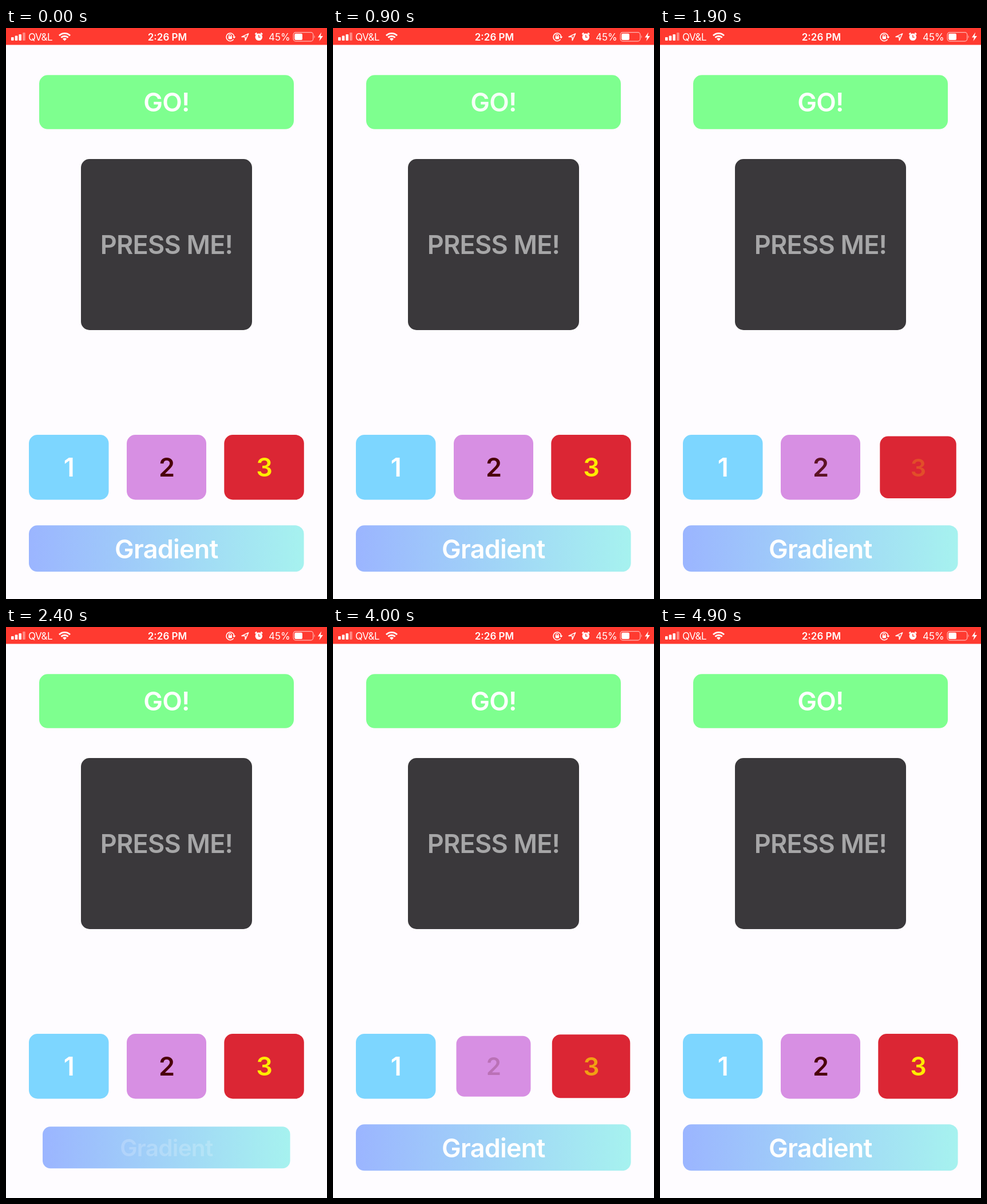
An HTML page that plays this animation: 561x998 px, repeating every 5 s.

```html
<!DOCTYPE html>
<html lang="en">
<head>
<meta charset="utf-8">
<title>Buttons</title>
<style>
  html, body { margin: 0; width: 100%; height: 100%; overflow: hidden; background: #fefcff; }
  svg { display: block; width: 100%; height: 100%; }
  text { font-family: Inter, Roboto, sans-serif; font-optical-sizing: none; }
  #buttons text { font-size: 45px; font-weight: 600; letter-spacing: -.018em; text-anchor: middle; }
  #status text { font-size: 17px; }
</style>
</head>
<body>
<svg viewBox="0 0 561 998">
  <defs>
    <linearGradient id="fade">
      <stop stop-color="#9bb5ff"/>
      <stop offset="1" stop-color="#a6f2ef"/>
    </linearGradient>
  </defs>
  <rect width="561" height="998" fill="#fefcff"/>
  <g id="status" fill="#fff">
    <rect width="561" height="29.5" fill="#ff3a30"/>
    <rect x="9" y="16" width="4.6" height="6" rx="1"/>
    <rect x="15.7" y="13.5" width="4.6" height="8.5" rx="1"/>
    <rect x="22.4" y="11" width="4.6" height="11" rx="1"/>
    <rect x="29.1" y="8" width="4.6" height="14" rx="1" opacity=".4"/>
    <text x="39" y="22" letter-spacing="-.4">QV&amp;L</text>
    <path d="M93 13.2a13.6 13.6 0 0 1 19 0M96.4 16.7a8.8 8.8 0 0 1 12.2 0" fill="none" stroke="#fff" stroke-width="2.9"/>
    <path d="M102.5 22.6l-3.5-3.6a5 5 0 0 1 7 0z"/>
    <text x="282" y="22" font-weight="600" text-anchor="middle">2:26 PM</text>
    <g fill="none" stroke="#fff" stroke-width="1.5">
      <path d="M397.6 19.6a6.8 6.8 0 1 1 1.1-4.2"/>
      <path d="M389.7 15v-1.6a2.1 2.1 0 0 1 4.2 0V15" stroke-width="1.3"/>
      <path d="M412 15.5l11.7-5.6-5.4 11.7-.3-6z" stroke-linejoin="round"/>
      <rect x="502.2" y="7.7" width="34.6" height="15.4" rx="4" stroke-width="1.2" opacity=".65"/>
      <path d="M435.5 11.2l2.8-2.5M448.1 11.2l-2.8-2.5" stroke-width="2.4"/>
    </g>
    <rect x="388.7" y="14.6" width="6.2" height="4.8" rx=".7"/>
    <path d="M396 15h5.4l-2.7 3.5z"/>
    <circle cx="441.8" cy="15.8" r="6.3"/>
    <path d="M441.8 12v4.2h3" fill="none" stroke="#ff3a30" stroke-width="1.3"/>
    <text x="459" y="22">45%</text>
    <rect x="504.3" y="9.8" width="13.7" height="11.2" rx="2"/>
    <path d="M538.6 12.5q2.2 2.8 0 5.8z" opacity=".65"/>
    <path d="M551.3 7.5l-6.3 8.9h4l-1.6 6.6 6.6-9h-4.3z"/>
  </g>
  <g id="buttons"></g>
</svg>
<script>
  // label, x, y, width, height, fill, text colour, presses as [down, up] in ms
  const buttons = [
    ["GO!", 58, 82.3, 445, 94.5, "#7eff8f", "#fff", [[510, 657]]],
    ["PRESS ME!", 131, 229, 299, 299, "#3a383b", "#a6a6a7", [[905, 1050]]],
    ["1", 40, 711, 139.5, 113.5, "#7dd6ff", "#fff", [[1220, 1365], [4200, 4350]]],
    ["2", 211, 711, 139, 113.5, "#d78fe3", "#4a0008", [[1530, 1676], [3080, 3320], [3880, 4030]]],
    ["3", 381.3, 711, 139.5, 113.5, "#db2634", "#ffeb00", [[1809, 1950], [3600, 3860]]],
    ["Gradient", 40, 869.3, 480.6, 81, "url(#fade)", "#fff", [[2110, 2830]]]
  ];
  const LOOP = 5000, STEP = 100, SCALE_TIME = 200, FADE_TIME = 267;
  const clamp = v => Math.min(1, Math.max(0, v));
  const ease = v => (v = clamp(v), v * v * (3 - 2 * v));

  function add(parent, tag, attrs) {
    const el = document.createElementNS("http://www.w3.org/2000/svg", tag);
    for (const key in attrs) el.setAttribute(key, attrs[key]);
    return parent.appendChild(el);
  }

  const root = document.getElementById("buttons");
  const views = buttons.map(([label, x, y, w, h, fill, color, presses]) => {
    const group = add(root, "g", {});
    add(group, "rect", { x: -w / 2, y: -h / 2, width: w, height: h, rx: 15, fill });
    const text = add(group, "text", { y: 16.7, fill: color });
    text.textContent = label;
    return { group, text, presses, cx: x + w / 2, cy: y + h / 2 };
  });

  // How far the button is pushed in, 0 to 1
  function depth(t, [down, up]) {
    const pushed = ease((Math.min(t, up) - down) / SCALE_TIME);
    return pushed * (1 - ease((t - up) / SCALE_TIME));
  }

  // The label dims at once and fades back after release
  function dim(t, [down, up]) {
    return t < down ? 0 : 1 - clamp((t - up) / FADE_TIME);
  }

  function draw(now) {
    const t = Math.floor(now % LOOP / STEP) * STEP;
    for (const { group, text, presses, cx, cy } of views) {
      const scale = 1 - .1 * Math.max(...presses.map(p => depth(t, p)));
      const alpha = 1 - .8 * Math.max(...presses.map(p => dim(t, p)));
      group.setAttribute("transform", `translate(${cx} ${cy}) scale(${scale})`);
      text.setAttribute("opacity", alpha);
    }
  }

  let start;
  function tick(now) {
    start ??= now;
    draw(now - start);
    requestAnimationFrame(tick);
  }
  draw(0);
  requestAnimationFrame(tick);
</script>
</body>
</html>
```
